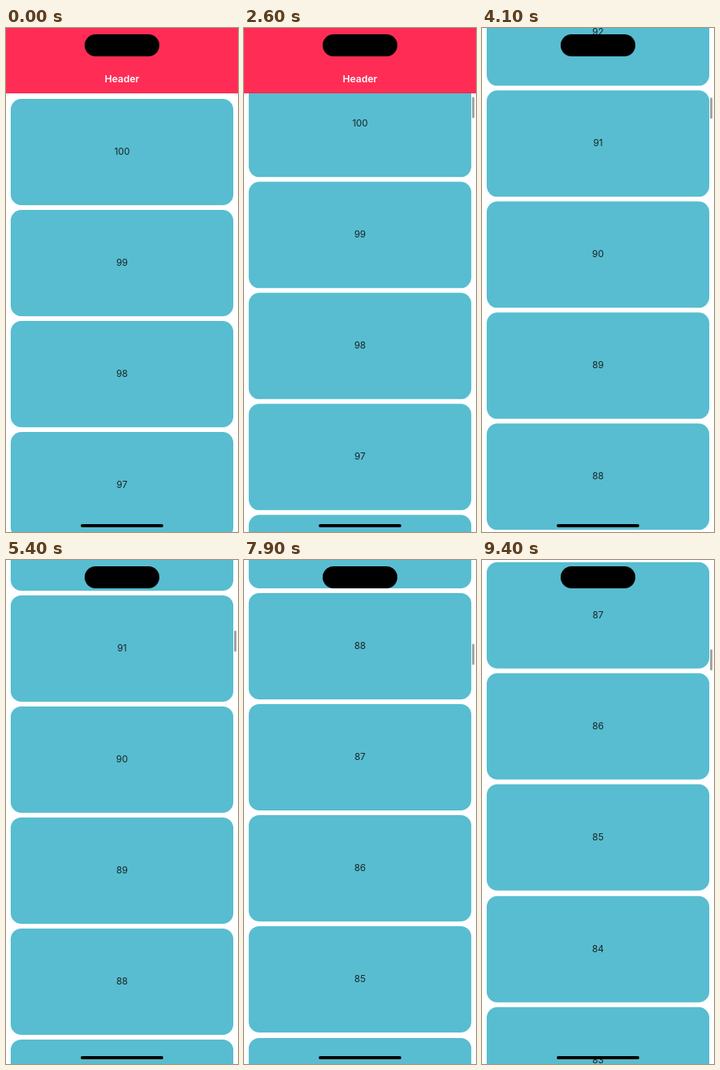
These frames come from a looping animation (295 px wide and 640 px high, 9500 ms). An HTML page:

```html
<!DOCTYPE html>
<html lang="en">
<head>
<meta charset="utf-8">
<title>Hiding header</title>
<style>
  html, body { margin: 0; width: 100%; height: 100%; overflow: hidden; background: #fff; }
  #stage { position: relative; width: 295px; height: 640px; overflow: hidden; font-family: Inter, Roboto, sans-serif; }
  #stage div { position: absolute; box-sizing: border-box; }
  #list { left: 0; top: 0; width: 295px; }
  .card {
    left: 6px; width: 283px; height: 135.1px; border-radius: 13.5px;
    background: #58bdd0; color: #1a2225; font-size: 11.8px; line-height: 135px; text-align: center;
  }
  #header {
    left: 0; top: 0; width: 295px; height: 83.3px; padding-top: 54.5px; background: #ff2d55;
    color: #fff; font-size: 12.4px; font-weight: 600; line-height: 20px; text-align: center;
  }
  #thumb { left: 290.4px; top: 0; width: 2.3px; height: 26.5px; border-radius: 2px; background: rgba(0, 0, 0, .36); }
  #island { left: 100.2px; top: 8.4px; width: 94.6px; height: 27.8px; border-radius: 14px; background: #000; }
  #home { left: 95.2px; top: 630.4px; width: 104.6px; height: 3.5px; border-radius: 2px; background: #000; }
</style>
</head>
<body>
<div id="stage">
  <div id="list"></div>
  <div id="thumb"></div>
  <div id="header">Header</div>
  <div id="island"></div>
  <div id="home"></div>
</div>
<script>
const LOOP = 9500, STEP = 100, PITCH = 141.12, TOP = 89.6, BAR = 84;
const DELAY = 430, SLIDE = 250;

// Each swipe glides on to a scroll offset
const swipes = [
  { start: 600, time: 1106, to: 735 },
  { start: 1700, time: 1183, to: 0 },
  { start: 3180, time: 1170, to: 1326.2 },
  { start: 5100, time: 1500, to: 1242.7 },
  { start: 6670, time: 1688, to: 1779 },
  { start: 8400, time: 1000, to: 1921.2 }
];

const $ = id => document.getElementById(id);
const list = $('list'), header = $('header'), thumb = $('thumb');

for (let i = 0; i < 20; i++) {
  const card = document.createElement('div');
  card.className = 'card';
  card.textContent = 100 - i;
  card.style.top = TOP + i * PITCH + 'px';
  list.append(card);
}

const progress = (t, start, time) => Math.max(0, Math.min(1, (t - start) / time));
const glide = u => 1 - (1 - u * u) ** 3.5;
const smooth = u => u * u * (3 - 2 * u);
const moveY = (el, y) => { el.style.transform = `translateY(${y.toFixed(2)}px)`; };

// A swipe towards the top shows the header, one away from it hides it
function poseAt(t) {
  let y = 0, shown = 1, from = 0;
  for (const { start, time, to } of swipes) {
    const want = to < from ? 1 : 0;
    y += (to - from) * glide(progress(t, start, time));
    shown += (want - shown) * smooth(progress(t, start + DELAY, SLIDE));
    from = to;
  }
  return { y, shown };
}

function draw(now) {
  const t = Math.floor((now % LOOP) / STEP) * STEP;
  const { y, shown } = poseAt(t);
  moveY(list, -y);
  moveY(header, (shown - 1) * BAR);
  moveY(thumb, 38.2 + 47.8 * shown + y * 0.0391);
  thumb.style.opacity = t > swipes[0].start ? 1 : 0;
}

let begin;
function tick(now) {
  begin ??= now;
  draw(now - begin);
  requestAnimationFrame(tick);
}
draw(0);
requestAnimationFrame(tick);
</script>
</body>
</html>
```
